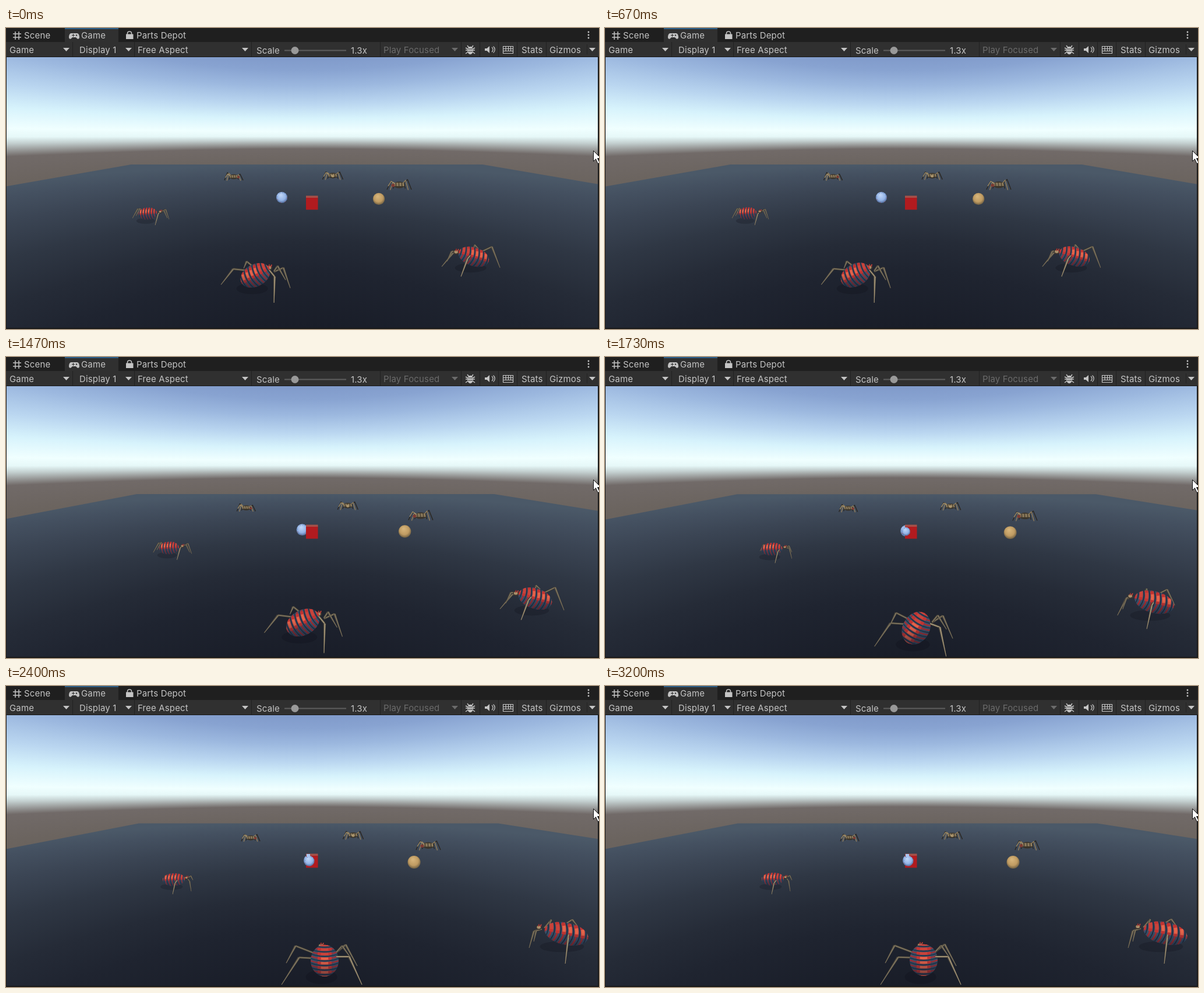
An HTML page with a canvas that plays this animation: 1018x516 px, repeating every 3270 ms.

```html
<!DOCTYPE html>
<html lang="en">
<head>
<meta charset="utf-8">
<title>Spiders</title>
<style>
html, body { margin: 0; width: 100%; height: 100%; overflow: hidden; background: #191919; }
canvas, svg { position: absolute; left: 0; top: 0; display: block; }
text { font: 15px Inter, "Open Sans", sans-serif; letter-spacing: .15px; fill: #c4c4c4; }
</style>
</head>
<body>
<canvas id="view" width="1018" height="516"></canvas>
<svg width="1018" height="516" viewBox="0 0 1018 516">
  <path fill="#1f1f1f" d="M0 0h1018v24H0z"/>
  <path fill="#303030" d="M101 0h92v24h-92zM0 24h1018v25H0z"/>
  <path fill="#2c5d87" d="M101 0h92v2h-92z"/>
  <path fill="#191919" d="M0 49h1018v1H0z"/>
  <path stroke="#212121" d="M114.500 24v25m106-25v25m201-25v25m221-25v25m139-25v25m32-25v25m32-25v25m32-25v25m50-25v25"/>
  <path stroke="#232323" d="M997.500 28v17"/>
  <g fill="none" stroke="#c4c4c4" stroke-width="1.500">
    <path d="M16 6v14m6-14v14M12 10h14m-14 6h14"/>
    <path d="M208.500 11V9a3.500 3 0 0 1 7 0v2"/>
    <path d="M834 33a5 5 0 0 1 0 8m2.500-9.500a7 7 0 0 1 0 11" stroke-width="1.300"/>
    <path d="M853.500 31.500h17v12h-17zm0 4h17m-17 4h17m-12.500-8v8m4.500-8v8m4-8v8" stroke-width="1.200"/>
    <path d="M792 30l3 4m7-4l-3 4m-10 0l4 2m12-2l-4 2m-12 2h16m-16 6l4-3m12 3l-4-3"/>
  </g>
  <g fill="#c4c4c4">
    <path d="M112 9h10c3 0 4 4 4 7s-3 4-5 1l-1-1h-6l-1 1c-2 3-5 2-5-1s1-7 4-7z"/>
    <path d="M206 10.500h12.500V19H206z"/>
    <path d="M822 35h3.500l4.500-4v12l-4.500-4H822z"/>
    <ellipse cx="797" cy="38.500" rx="4.800" ry="6.800"/>
    <circle cx="1000" cy="7" r="1.400"/><circle cx="1000" cy="12" r="1.400"/><circle cx="1000" cy="17" r="1.400"/>
    <path d="M98 34h11l-5.500 6zM205 34h11l-5.500 6zM405 34h11l-5.500 6zM1001 34h11l-5.500 6z"/>
  </g>
  <path fill="#6b6b6b" d="M765 34h11l-5.500 6z"/>
  <path stroke="#303030" d="M113 12.500h5m-2.500-2.500v5M793 36h8m-8 4h8"/>
  <circle cx="121" cy="12.500" r="1.200" fill="#303030"/>
  <path stroke="#5e5e5e" stroke-width="2" d="M478 38.500h106"/>
  <circle cx="496" cy="38.500" r="6.500" fill="#999"/>
  <text x="31" y="18">Scene</text>
  <text x="129" y="18">Game</text>
  <text x="224" y="18">Parts Depot</text>
  <text x="6" y="43">Game</text>
  <text x="126" y="43">Display 1</text>
  <text x="226" y="43">Free Aspect</text>
  <text x="430" y="44">Scale</text>
  <text x="592" y="44">1.3x</text>
  <text x="648" y="43" style="fill:#6b6b6b">Play Focused</text>
  <text x="885" y="43">Stats</text>
  <text x="933" y="43">Gizmos</text>
  <path fill="#191919" d="M0 50h1v466H0zM1016 50h2v466h-2zM0 514h1018v2H0z"/>
  <path fill="#fff" stroke="#111" d="M1008.500 210.500v18l4-4 3.500 8 3-1.500-3.500-7.500h6z"/>
</svg>
<script>
const W = 1018, H = 516, LOOP = 3270, HORIZON = 185;
const ctx = document.getElementById('view').getContext('2d');
const mix = (a, b, k) => a + (b - a) * k;
const mixAll = (a, b, k) => a.map((v, i) => mix(v, b[i], k));

// piecewise linear track of [time, value] steps
function track(steps, t) {
  if (t <= steps[0][0]) return steps[0][1];
  for (let i = 1; i < steps.length; i++) {
    const [t0, v0] = steps[i - 1], [t1, v1] = steps[i];
    if (t < t1) return mix(v0, v1, (t - t0) / (t1 - t0));
  }
  return steps[steps.length - 1][1];
}

const PAN = [[600, 0], [670, .02], [800, .09], [1000, .25], [1470, .74], [1750, .93], [2000, 1]];
const NEAR = [[900, 0], [1000, .02], [1100, .12], [1470, .67], [1800, .95], [2000, 1]];
const TURN = [[1490, 0], [1600, .15], [1850, .85], [1980, 1]];

// wide-angle backdrop: elevation bands spread out towards the sides
function backdrop(stops) {
  const layer = document.createElement('canvas');
  layer.width = W; layer.height = H;
  const c = layer.getContext('2d');
  const g = c.createLinearGradient(0, -135, 0, 330);
  for (const [y, col] of stops) g.addColorStop((y + 135) / 465, col);
  c.fillStyle = g;
  for (let x = 0; x < W; x++) {
    const u = (x - 508) / 508;
    c.setTransform(1, 0, 0, Math.sqrt(1 + 1.6 * u * u), 0, HORIZON);
    c.fillRect(x, -200, 1, 600);
  }
  return layer;
}
const sky = backdrop([[-135, '#809aca'], [-112, '#88a3d1'], [-85, '#9cb8df'], [-55, '#bad6f0'],
  [-30, '#d7f3fc'], [-8, '#f0ffff'], [1, '#e6f8f8'], [8, '#c3cfcf'], [15, '#9a9c9b'],
  [22, '#716a68'], [50, '#6b645f'], [90, '#665e57']]);
const floor = backdrop([[49, '#4b5968'], [65, '#445060'], [90, '#3b4554'], [130, '#2f3744'],
  [180, '#252b37'], [230, '#1f2430'], [330, '#191d28']]);

// pose: body = rx, ry, angle, ridge; head = x, y; legs = hip, knee, foot
const pose = (body, head, ...legs) => ({ body, head, legs });
const big = [
  { from: [243, 318], to: [293, 331], grow: .07, leg: 2, shift: -5,
    a: pose([16, 10.5, -.08, -.4], [22, -3],
      [-5, -5, -17, -8, -26, 8], [-8, -3, -13, -9, -20, 4], [20, -2, 31, -7, 37, 10],
      [20, -2, 28, -5, 34, 8], [20, -1, 18, 1, 13, 20]),
    b: pose([19, 11, -.05, -.4], [22, -3],
      [5, -5, 8, -9, 12, -3], [-10, -3, -14, -7, -19, 2], [23, -2, 27, 3, 30, 21],
      [23, -2, 29, -6, 33, 2], [6, 2, 2, 7, -2, 26]) },
  { from: [803, 392], to: [946, 424], grow: .15, leg: 3, shift: 16,
    a: pose([27, 16, 3.45, .4], [-30, -8],
      [-28, -7, -36, -6, -55, 17], [-26, -9, -38, -9, -46, 8], [12, -8, 31, -17, 45, 19],
      [0, -8, 1, -20, 8, -14], [-6, -2, -11, 4, -22, 34]),
    b: pose([38, 19, 3.35, .4], [-47, -11],
      [-44, -9, -56, -4, -64, 25], [-42, -8, -52, -5, -56, 14], [0, -18, 10, -24, 21, -10],
      [-38, -10, -26, -24, -32, -8], [4, 2, 3, 7, -2, 52]) },
  { from: [428, 424], to: [539, 470], grow: .19, leg: 3.2, shift: 8,
    a: pose([27, 19, -.5, -.35], [24, -13],
      [-10, -8, -38, -11, -59, 16], [0, -12, -15, -24, -20, -12], [32, -6, 48, -13, 60, 22],
      [32, -7, 38, -16, 52, 8], [24, -9, 33, 2, 32, 47]),
    b: pose([27, 24, -1.57, 0], [-6, -25],
      [-18, -4, -44, -5, -74, 42], [-16, -12, -50, -25, -66, 5], [18, -12, 36, -27, 56, 10],
      [18, -12, 30, -25, 44, -5], [20, -6, 42, -6, 64, 42]) }
];
const small = [
  { from: [391, 255], to: [420, 260], size: 16, face: 1 },
  { from: [561, 253], to: [596, 256], size: 17.5, face: 0 },
  { from: [675, 269], to: [725, 273], size: 21, face: -1 }
];

function oval(x, y, rx, ry, fill, rot = 0) {
  ctx.beginPath();
  ctx.ellipse(x, y, rx, ry, rot, 0, 7);
  ctx.fillStyle = fill;
  ctx.fill();
}

function line(w, col, ...p) {
  ctx.beginPath();
  for (let i = 0; i < p.length; i += 2) ctx.lineTo(p[i], p[i + 1]);
  ctx.lineWidth = w;
  ctx.strokeStyle = col;
  ctx.stroke();
}

function poly(fill, ...p) {
  ctx.beginPath();
  for (let i = 0; i < p.length; i += 2) ctx.lineTo(p[i], p[i + 1]);
  ctx.fillStyle = fill;
  ctx.fill();
}

// tapered shin with a shaded side
function drawLeg([hx, hy, kx, ky, fx, fy], w, light) {
  const len = Math.hypot(fx - kx, fy - ky) || 1;
  const nx = (fy - ky) / len * w / 2, ny = (kx - fx) / len * w / 2;
  line(w + .6, '#3b3833', hx, hy, kx, ky);
  line(w * .55, light, hx, hy, kx, ky);
  poly('#4b463d', kx + nx * 1.3, ky + ny * 1.3, fx + nx * .35, fy + ny * .35,
    fx - nx * .35, fy - ny * .35, kx - nx * 1.3, ky - ny * 1.3);
  poly(light, kx + nx * .8, ky + ny * .8, fx + nx * .3, fy + ny * .3,
    fx - nx * .2, fy - ny * .2, kx - nx * .4, ky - ny * .4);
}

// curved stripe across the abdomen, from v0 to v1 (-1..1)
function stripe(u, rx, ry, v0, v1, w, col) {
  const pts = [];
  for (let i = 0; i <= 6; i++) {
    const v = mix(v0, v1, i / 6);
    pts.push(u - rx * .16 * (1 - v * v), v * ry);
  }
  line(w, col, ...pts);
}

function drawBody([rx, ry, rot, ridge]) {
  ctx.save();
  ctx.rotate(rot);
  ctx.beginPath();
  ctx.ellipse(0, 0, rx, ry, 0, 0, 7);
  ctx.clip();
  ctx.fillStyle = '#36516b';
  ctx.fillRect(-rx, -ry, 2 * rx, 2 * ry);
  const gap = rx * .29;
  for (let i = 0; i < 8; i++) {
    const u = -rx * .88 + i * gap;
    stripe(u + gap / 2, rx, ry, -1, 1, gap * .16, '#1e2c3d');
    stripe(u, rx, ry, -1, 1, gap * .3, '#a12e33');
    stripe(u, rx, ry, ridge - .5, ridge + .5, gap * .62, '#c03431');
    stripe(u, rx, ry, ridge - .26, ridge + .26, gap * .5, i < 5 ? '#e4644a' : '#c8443b');
  }
  ctx.rotate(-rot);
  const shade = ctx.createLinearGradient(0, -ry, 0, ry);
  shade.addColorStop(.45, 'rgba(18,24,38,0)');
  shade.addColorStop(1, 'rgba(18,24,38,.45)');
  ctx.fillStyle = shade;
  ctx.fillRect(-rx, -rx, 2 * rx, 2 * rx);
  ctx.restore();
}

function drawHead([x, y], w) {
  oval(x, y, w * 1.7, w * 1.4, '#3b342f');
  oval(x - .3, y - .3, w * 1.1, w * .9, '#a8906c');
  line(w * .55, '#a92f2e', x - w * .3, y - w * .5, x + w * .1, y - w * 1.8);
  line(w * .55, '#c0403a', x + w * .7, y - w * .3, x + w * 1.3, y - w * 1.7);
}

function drawBig(s, pan, near, turn, bob) {
  const k = 1 + s.grow * near;
  const grown = list => list.map(v => v * k);
  const body = mixAll([s.a.body[0] * k, s.a.body[1] * k, s.a.body[2], s.a.body[3]], s.b.body, turn);
  const head = mixAll(grown(s.a.head), s.b.head, turn);
  const legs = s.a.legs.map((l, i) => mixAll(grown(l), s.b.legs[i], turn));
  ctx.save();
  ctx.translate(mix(s.from[0], s.to[0], pan) + s.shift * turn, mix(s.from[1], s.to[1], near));
  oval(-body[0] * .2, body[1] * 1.2, body[0], body[1] * .5, 'rgba(10,12,20,.22)');
  for (const l of legs.slice(0, 4)) {
    l[1] += bob; l[3] += bob * .6;
    drawLeg(l, s.leg, '#80765f');
  }
  ctx.translate(0, bob);
  drawHead(head, s.leg);
  drawBody(body);
  ctx.translate(0, -bob);
  drawLeg(legs[4], s.leg * 1.1, '#a59678');
  ctx.restore();
}

const TWIG = [[.68, -.36, 1, .38], [.52, -.3, .74, .42], [.38, -.05, .5, .3]];
function drawSmall(s, pan, near, turn, bob) {
  const n = s.size;
  ctx.save();
  ctx.translate(mix(s.from[0], s.to[0], pan), mix(s.from[1], s.to[1], near));
  for (const side of [-1, 1]) {
    TWIG.forEach(([kx, ky, fx, fy], i) => {
      const sway = s.face * side * .08 * (1 - turn);
      line(1.5, i === 1 ? '#8d7b5c' : '#2b2824', side * n * .2, bob * .4,
        side * n * kx, n * (ky + sway) + bob * .4, side * n * fx, n * fy);
    });
  }
  line(1.2, '#a8946c', -n * .9, n * .1, -n * .66, -n * .3, -n * .2, 0);
  ctx.translate(0, bob * .4);
  oval(0, 0, n * .48, n * .27, '#3a342b');
  for (let i = -3; i < 4; i++)
    line(n * .07, i % 2 ? '#bda67a' : '#7f6f53', i * n * .12 - 1, -n * .18, i * n * .12, n * .1);
  oval(s.face * n * .5, n * .04, n * .14, n * .13, s.face ? '#7d3a32' : '#aa946c');
  ctx.restore();
}

function ball(x, y, r, hi, base, low) {
  const g = ctx.createRadialGradient(x - r * .2, y - r * .45, r * .1, x, y - r * .1, r * 1.15);
  g.addColorStop(0, hi);
  g.addColorStop(.62, base);
  g.addColorStop(1, low);
  oval(x, y, r, r, g);
}
function blueBall(x, y, r) {
  ball(x, y, r, '#bdd4f6', '#94b4e6', '#4c6797');
  for (let i = 0; i < 12; i++) {
    const a = i * 2.4;
    ctx.fillStyle = i % 3 ? '#5575ad' : '#a94a52';
    ctx.fillRect(x + Math.cos(a) * r * .88, y + Math.sin(a) * r * .88, 1, 1);
  }
}

function drawBalls(pan, near) {
  const x = mix(473.5, 521, pan), y = mix(290.5, 299, near);
  blueBall(x, y, mix(9.6, 10, near));
  ctx.fillStyle = '#a65049';
  ctx.fillRect(515, 287.5, 20.5, 4);
  ctx.fillStyle = '#b11b1f';
  ctx.fillRect(515, 291, 20.5, 20.5);
  // part of the ball that comes out through the cube
  const out = Math.max(0, (pan - .76) / .24);
  if (out > 0) {
    blueBall(x - .5, y + 1, 9 * Math.sqrt(out));
    ctx.fillStyle = '#a9c6f2';
    if (out > .8) ctx.fillRect(x - 5, y - 11, 6, 5);
  }
  ball(mix(640, 700.5, pan), mix(293, 302, near), mix(10.2, 11, near), '#d6b47a', '#bf9b62', '#66583f');
}

function draw(t) {
  const pan = track(PAN, t), near = track(NEAR, t), turn = track(TURN, t);
  const bob = Math.sin(t / LOOP * Math.PI * 6) * .8;
  ctx.drawImage(sky, 0, 0);
  ctx.save();
  ctx.beginPath();
  const edge = mix(234, 235.5, near);
  ctx.moveTo(0, mix(271.5, 279.5, pan));
  ctx.lineTo(mix(215, 228, pan), edge);
  ctx.lineTo(mix(818, 845, pan), edge);
  ctx.lineTo(W, mix(268, 262.5, pan));
  ctx.lineTo(W, H);
  ctx.lineTo(0, H);
  ctx.clip();
  ctx.drawImage(floor, 0, 0);
  ctx.restore();
  small.forEach((s, i) => drawSmall(s, pan, near, turn, i % 2 ? -bob : bob));
  drawBalls(pan, near);
  for (const s of big) drawBig(s, pan, near, turn, bob);
}

ctx.lineJoin = 'round';
const start = performance.now();
function tick() {
  const t = Math.max(0, performance.now() - start) % LOOP;
  draw(Math.min(48, Math.floor(t / 66.2)) * 66.7);
  requestAnimationFrame(tick);
}
tick();
</script>
</body>
</html>
```
